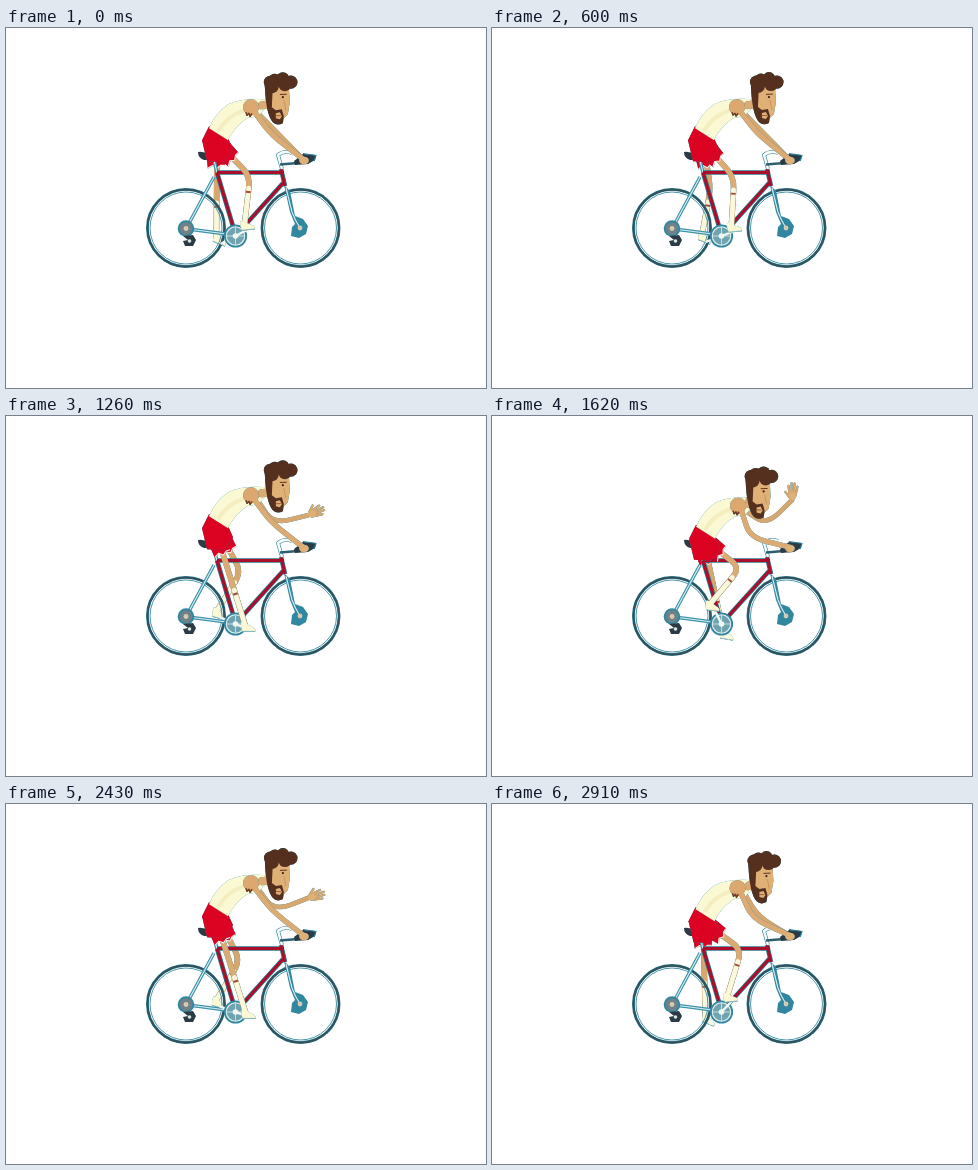
Recreate the animation shown at these times as an HTML page. Size 480 by 360 pixels, loop 2.94 s.

```html
<!DOCTYPE html>
<html lang="en">
<head>
<meta charset="utf-8">
<title>Cyclist</title>
<style>
  html, body { margin: 0; width: 100%; height: 100%; overflow: hidden; background: #fff; }
  svg { display: block; width: 100vw; height: 100vh; }
  path, line { fill: none; stroke-linejoin: round; }
  .fringe { filter: drop-shadow(0 0 .7px #0f7f99); }
  .skin { stroke: #dcab73; stroke-linecap: round; }
  .skinFill { fill: #e0b176; }
  .far .skin { stroke: #d6a76f; }
  .sock { stroke: #f9f7dc; stroke-linecap: round; }
  .band { stroke: #a8492f; stroke-width: 4.8; }
  .red { fill: #dc0322; }
  .hem { stroke: #fbeee0; stroke-width: 1.1; }
  .hair { fill: #55301f; }
  .cream { fill: #fbf8d4; }
  .steel { stroke: #3c93ab; stroke-width: 3.4; }
  .shine { stroke: #d9eef2; stroke-width: 1.1; }
  .tube { stroke: #2a7b8f; stroke-width: 4.6; }
  .paint { stroke: #ab0d2b; stroke-width: 3; }
  .crank { stroke: #f3f7f3; stroke-width: 2.4; stroke-linecap: round; }
  .dark { fill: #2a3b45; }
  .teal { fill: #3287a0; }
</style>
</head>
<body>
<svg viewBox="0 0 480 360" preserveAspectRatio="none">
  <defs>
    <g id="wheel" fill="none">
      <circle r="38.6" stroke="#258097" stroke-width="2.8"/>
      <circle r="38.5" stroke="#34505a" stroke-width="1.9"/>
      <circle r="36" stroke="#378da3" stroke-width=".9"/>
    </g>
    <g id="shoe">
      <path class="cream" d="M-9-6Q-5-7-3-4L3-1Q6 1 5 3H-8Q-10-2-9-6Z"/>
      <path d="M-8 3H5" stroke="#8fb6bd" stroke-width=".8"/>
    </g>
    <g id="leg">
      <path class="skin" stroke-width="5.6"/>
      <path class="sock" stroke-width="4.8"/>
      <path class="band"/>
      <use href="#shoe"/>
      <path class="red"/>
      <path class="hem"/>
    </g>
  </defs>

  <g id="farArm" class="far fringe">
    <path class="skin" stroke-width="4.6"/>
    <g id="hand">
      <ellipse cy="-5" rx="4.3" ry="5" class="skinFill"/>
      <path class="skin" stroke-width="2.1" d="M-3-7-4-14M-.7-8-1-17M1.8-8 2-16.5M3.6-6 5-13.5M-3-3-7-8"/>
    </g>
  </g>

  <g id="farLeg" class="far fringe"></g>

  <g id="bike">
    <use href="#wheel" x="180" y="200"/>
    <use href="#wheel" x="294.5" y="200"/>
    <path class="steel" d="M208 149 181 199M182 201 228 207"/>
    <path class="shine" d="M208 149 181 199M182 201 228 207"/>
    <circle cx="180" cy="200.5" r="8.3" class="teal"/>
    <circle cx="180" cy="200.5" r="6.3" fill="#6f8288"/>
    <circle cx="180" cy="200.5" r="2.4" fill="#d8c9b4"/>
    <path class="dark" d="M177 208 187 207 190 212 187 218 179 218 177 213 182 212Z"/>
    <circle cx="183.5" cy="213" r="1.8" fill="#d8e6e4"/>
    <path class="teal" d="M278 157 284 163 289 188 297 191 302 198 300 206 293 210 285 208 286 199 289 196 284 184Z"/>
    <path class="shine" d="M280 160 286 184Q289 192 294 200"/>
    <circle cx="294" cy="200" r="2.4" fill="#d8c9b4"/>
    <path class="steel" d="M208 132 211 145"/>
    <path class="shine" d="M208 132 211 145"/>
    <path class="tube" d="M211 144.5H278M278 154 232 205M211 144.5 229 205M275 141 279 158"/>
    <path class="paint" d="M211 144.5H278M278 154 232 205M211 144.5 229 205M275 141 279 158"/>
    <path class="dark" d="M192 124Q198 123 203 127L212 128Q213 131 207 132L198 132Q192 130 192 124Z"/>
    <path d="M276 141 272 127Q278 122 286 125" stroke="#2f8299" stroke-width="3.8"/>
    <path d="M276 141 272 127Q278 122 286 125" stroke="#f6faf8" stroke-width="2.6"/>
    <path d="M274 136.5 292 135" stroke="#2d5f70" stroke-width="2.6"/>
    <path class="dark" d="M288 133 297 126 310 127 309 132 302 136 289 137Z"/>
    <path d="M297 125.5 310 127.5 308 133" stroke="#267f98" stroke-width="1.2"/>
    <line id="farCrank" class="crank"/>
    <circle cx="229.5" cy="208" r="11.6" class="teal"/>
    <circle cx="229.5" cy="208" r="9.2" fill="#6fa3b0" stroke="#e3f0f0" stroke-width="1.1"/>
    <path d="M229.5 199V217M220.5 208H238.5" stroke="#c4dfe2" stroke-width="1"/>
    <circle cx="229.5" cy="208" r="2.8" fill="#f2f5ef"/>
    <line id="nearCrank" class="crank"/>
  </g>

  <g id="nearLeg" class="fringe"></g>

  <g id="body" class="fringe">
    <path class="red" d="M203 98 222 110 227 121 218 134 201 133 196 112Z"/>
    <path class="cream" d="M203 100Q209 85 222 76 237 69 261 71L259 81 252 88 241 90Q228 99 222 112Z"/>
    <path d="M212 103Q220 88 238 82" stroke="#f3edbf" stroke-width="4"/>
  </g>

  <g class="fringe">
    <path id="neck" class="skin" stroke-width="8"/>
    <g id="head">
      <path class="skinFill" d="M263 58H283L284 74 282 86 278 90 270 92 262 82Z"/>
      <path class="hair" d="M259 58H267L266 79 270 82 276 81 278 88 277 95Q271 98 267 94 260 86 259 58Z"/>
      <path class="skinFill" d="M270 85 274 84 276 88 274 91 270 90Z"/>
      <path d="M270 87.5H275" stroke="#8f4430" stroke-width=".8"/>
      <path d="M278 72 280 82" stroke="#bd8852" stroke-width=".7"/>
      <circle cx="277" cy="69" r="1.1" fill="#3a2018"/>
      <path d="M274 66.3 281 66" stroke="#633522" stroke-width="1"/>
      <g class="hair">
        <circle cx="264.5" cy="54" r="6.5"/><circle cx="269" cy="52" r="6.5"/>
        <circle cx="277" cy="50.3" r="6.3"/><circle cx="285" cy="54" r="6.6"/>
        <circle cx="266" cy="58" r="7"/><circle cx="279" cy="56.5" r="6.5"/>
      </g>
    </g>
  </g>

  <g id="nearArm" class="fringe">
    <path class="skin" stroke-width="5.2"/>
    <g id="shoulder">
      <circle cx="245" cy="79" r="8" fill="#dca870"/>
      <path d="M240 84 241 87 243 85 244 88 246 85" stroke="#713721" stroke-width="1.4"/>
    </g>
    <ellipse cx="298" cy="132.5" rx="4.8" ry="3.8" class="skinFill"/>
  </g>
</svg>
<script>
const LOOP = 2940, STEP = 30, TURN = LOOP / 5;
const HUB = [229.5, 208], CRANK = 16, RAD = Math.PI / 180;
const $ = id => document.getElementById(id);
const mix = (a, b, k) => a.map((v, i) => v + (b[i] - v) * k);
const pt = p => p[0].toFixed(2) + ' ' + p[1].toFixed(2);
const move = (el, x, y, r = 0) =>
  el.setAttribute('transform', `translate(${x} ${y}) rotate(${r})`);
const draw = (el, d) => el.setAttribute('d', d);

for (const id of ['farLeg', 'nearLeg'])
  for (const part of $('leg').children) $(id).append(part.cloneNode(true));

// Time, wrist x, wrist y, hand tilt
const wave = [
  [1080, 297, 131, 110], [1350, 304, 88, 50], [1620, 300, 84, 2],
  [1840, 305, 87, 58], [2070, 303, 82, 42], [2250, 300, 85, 8],
  [2430, 302, 94, 72], [2700, 297, 131, 110]
];

function waveAt(t) {
  const i = wave.findIndex(k => k[0] > t);
  if (i < 1) return wave[0];
  const a = wave[i - 1], b = wave[i], k = (t - a[0]) / (b[0] - a[0]);
  return mix(a, b, k * k * (3 - 2 * k));
}

// Middle joint of a two-part limb; side picks the bend direction
function joint(p, q, l1, l2, side) {
  const dx = q[0] - p[0], dy = q[1] - p[1], d = Math.hypot(dx, dy);
  if (d >= l1 + l2) return mix(p, q, l1 / (l1 + l2));
  const a = (l1 * l1 - l2 * l2 + d * d) / (2 * d);
  const h = side * Math.sqrt(Math.max(0, l1 * l1 - a * a));
  return [p[0] + (dx * a + dy * h) / d, p[1] + (dy * a - dx * h) / d];
}

const limb = (p, j, q, k1, k2) =>
  `M${pt(p)}L${pt(mix(p, j, k1))}Q${pt(j)} ${pt(mix(j, q, k2))}L${pt(q)}`;

function poseLeg(id, crank, hip, angle) {
  const pedal = [HUB[0] + CRANK * Math.cos(angle), HUB[1] + CRANK * Math.sin(angle)];
  const ankle = [pedal[0] - 5, pedal[1] - 5];
  const knee = joint(hip, ankle, 50, 48, 1);
  const [skin, sock, band, shoe, shorts, hem] = $(id).children;
  draw(skin, limb(hip, knee, ankle, .78, .25));
  draw(sock, `M${pt(mix(knee, ankle, .26))}L${pt(ankle)}`);
  draw(band, `M${pt(mix(knee, ankle, .32))}L${pt(mix(knee, ankle, .36))}`);
  move(shoe, pedal[0], pedal[1] - 2, 8 + 14 * Math.sin(angle - 1));

  const len = Math.hypot(knee[0] - hip[0], knee[1] - hip[1]);
  const u = [(knee[0] - hip[0]) / len, (knee[1] - hip[1]) / len];
  const at = (along, out) =>
    pt([hip[0] + u[0] * along + u[1] * out, hip[1] + u[1] * along - u[0] * out]);
  const edge = `${at(28, -9)}L${at(25, -4)}L${at(28, 0)}L${at(25, 4)}L${at(25, 8)}`;
  draw(shorts, `M${at(-5, 10)}L${at(-5, -11)}L${at(8, -11)}L${edge}Z`);
  draw(hem, 'M' + edge);

  const c = $(crank);
  c.setAttribute('x1', HUB[0]); c.setAttribute('y1', HUB[1]);
  c.setAttribute('x2', pedal[0]); c.setAttribute('y2', pedal[1]);
}

function render(t) {
  const angle = (t / TURN * 360 - 28) * RAD;
  const drop = 5.5 * (1 - Math.tanh(2.8 * Math.cos(2 * (angle - 178 * RAD))));
  const hip = [209, 112 + drop * .85];

  poseLeg('farLeg', 'farCrank', [hip[0] + 2, hip[1]], angle + Math.PI);
  poseLeg('nearLeg', 'nearCrank', hip, angle);

  move($('body'), drop * .1, drop);
  move($('shoulder'), drop * .1, drop);
  move($('head'), -drop * .5, drop * .6);
  draw($('neck'), `M${pt([256, 77 + drop])}L${pt([264 - drop * .5, 76 + drop * .6])}`);

  const near = [248 + drop * .1, 83 + drop], grip = [297, 131];
  draw($('nearArm').children[0], limb(near, joint(near, grip, 29, 40, -1), grip, .6, .4));

  const [, x, y, tilt] = waveAt(t), far = [253, 86 + drop * .8];
  draw($('farArm').children[0], limb(far, joint(far, [x, y], 26, 36, -1), [x, y], .5, .5));
  move($('hand'), x, y, tilt);
  $('hand').style.display = tilt < 108 ? '' : 'none';
}

const start = performance.now();
function tick() {
  const t = (performance.now() - start) % LOOP;
  render(Math.floor(t / STEP) * STEP);
  requestAnimationFrame(tick);
}
tick();
</script>
</body>
</html>
```
